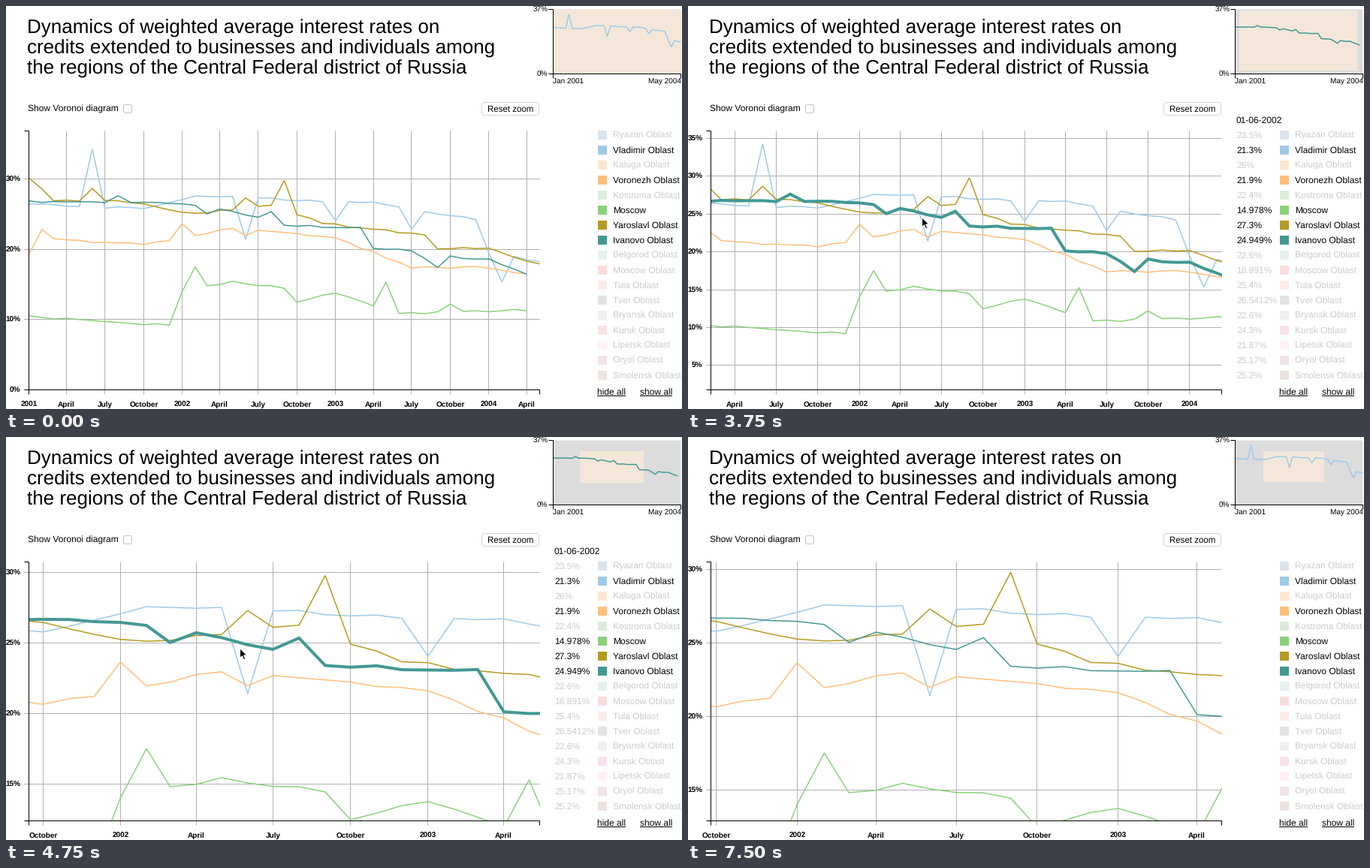
Animation, 900 px wide and 537 px high, one loop 7.75 s. Source, as a matplotlib script:

```python
import numpy as np
import matplotlib.pyplot as plt
from matplotlib.animation import FuncAnimation
from matplotlib.patches import Circle, FancyBboxPatch, Polygon, Rectangle

plt.rcParams.update({
    "font.family": "Liberation Sans",
    "text.hinting": "none",
    "path.snap": False,
    "toolbar": "None",
})

W, H, DPI = 900, 537, 72            # 72 dpi: one point is one pixel
STEP_MS, FRAMES = 250, 31

LEFT, RIGHT, TOP, BOTTOM = 30.5, 710.5, 166.5, 511.5
MINI_L, MINI_R, MINI_T, MINI_B = 728.5, 898.5, 4.5, 90.5
V_MAX = 36.84
FOCUS = (316.4, 280.1)              # fixed point of the zoom
GRID, FADED = "#b0b0b0", "#cccccc"
HOVER_MONTH = 17

LEGEND = [
    ("Ryazan Oblast", "#4c78a8", "23.5%"),
    ("Vladimir Oblast", "#9ecae9", "21.3%"),
    ("Kaluga Oblast", "#f58518", "26%"),
    ("Voronezh Oblast", "#ffbf79", "21.9%"),
    ("Kostroma Oblast", "#54a24b", "22.4%"),
    ("Moscow", "#88d27a", "14.978%"),
    ("Yaroslavl Oblast", "#b79a20", "27.3%"),
    ("Ivanovo Oblast", "#439894", "24.949%"),
    ("Belgorod Oblast", "#83bcb6", "22.6%"),
    ("Moscow Oblast", "#e45756", "18.891%"),
    ("Tula Oblast", "#ff9d98", "25.4%"),
    ("Tver Oblast", "#79706e", "26.5412%"),
    ("Bryansk Oblast", "#bab0ac", "22.6%"),
    ("Kursk Oblast", "#e07080", "24.3%"),
    ("Lipetsk Oblast", "#fcbfd2", "21.87%"),
    ("Oryol Oblast", "#b2798a", "25.17%"),
    ("Smolensk Oblast", "#9e765f", "25.2%"),
]
COLORS = {name: color for name, color, _ in LEGEND}

rng = np.random.default_rng(7)


def series(trend, spikes):
    """Monthly rates: a trend through key points, one-month spikes, slight jitter."""
    keys, rates = zip(*trend)
    values = np.interp(np.arange(keys[-1] + 1), keys, rates)
    for month, height in spikes.items():
        values[month] += height
    return values + rng.uniform(-0.15, 0.15, len(values))


SERIES = {
    "Vladimir Oblast": series(
        [(0, 26.4), (9, 25.8), (13, 27.6), (27, 26.6), (35, 24.3), (36, 19.5), (40, 18.3)],
        {5: 8.1, 17: -6, 24: -2.6, 30: -2.9, 37: -3.7}),
    "Voronezh Oblast": series(
        [(0, 21.6), (9, 20.7), (16, 23), (24, 21.7), (30, 17.4), (35, 17.4), (39, 16.6)],
        {0: -2.4, 1: 1.3, 12: 2, 17: -1}),
    "Moscow": series(
        [(0, 10.4), (11, 9.2), (12, 14), (16, 15.5), (20, 14.4), (21, 12.5), (24, 13.8),
         (29, 10.8), (39, 11.4)],
        {13: 3.2, 28: 3.9, 33: 1.3}),
    "Yaroslavl Oblast": series(
        [(0, 30.1), (2, 26.9), (7, 27), (13, 25), (19, 26.2), (23, 23.7), (31, 22),
         (32, 20), (36, 20.2), (40, 17.8)],
        {5: 1.8, 17: 1.5, 20: 4.2}),
    "Ivanovo Oblast": series(
        [(0, 26.8), (12, 26.6), (17, 25), (20, 23.3), (26, 23.2), (27, 20.2), (30, 19.9),
         (32, 17.5), (33, 19), (36, 18.5), (39, 16.4)],
        {7: 0.8, 14: -1, 19: 1.4}),
}

months = np.arange("2001-01", "2004-06", dtype="datetime64[M]")
days = months.astype("datetime64[D]").astype(float)
month_pos = (days - days[0]) / (days[-1] - days[0])

fig = plt.figure(figsize=(W / DPI, H / DPI), dpi=DPI, facecolor="white")
ax = fig.add_axes([0, 0, 1, 1])
ax.set(xlim=(0, W), ylim=(H, 0))
ax.axis("off")

clip = Rectangle((LEFT, TOP), RIGHT - LEFT, BOTTOM - TOP, transform=ax.transData)


def text(x, y, s, size=12, **kw):
    return ax.text(x, y, s, fontsize=size, va="baseline", zorder=6, **kw)


def line(xs, ys, color="black", width=1, z=4):
    return ax.plot(xs, ys, color=color, lw=width, zorder=z, solid_joinstyle="miter",
                   solid_capstyle="butt")[0]


def box(x, y, w, h, color, z=1, **kw):
    return ax.add_patch(Rectangle((x, y), w, h, fc=color, ec="none", lw=0, zorder=z, **kw))


def rounded(x, y, w, h, radius, color):
    style = f"round,pad=0,rounding_size={radius}"
    ax.add_patch(FancyBboxPatch((x, y), w, h, boxstyle=style, fc="white", ec=color, lw=1))


def crisp(v):
    return np.floor(v) + 0.5


def plot_x(pos, k):
    x = LEFT + (RIGHT - LEFT) * pos
    return FOCUS[0] + (x - FOCUS[0]) * k


def plot_y(value, k):
    y = BOTTOM - (BOTTOM - TOP) * value / V_MAX
    return FOCUS[1] + (y - FOCUS[1]) * k


def draw_axes(left, right, top, bottom, tick=6):
    line([left - tick, left, left, left - tick], [top, top, bottom, bottom])
    line([left, left, right, right], [bottom + tick, bottom, bottom, bottom + tick])


def draw_static():
    title = ("Dynamics of weighted average interest rates on",
             "credits extended to businesses and individuals among",
             "the regions of the Central Federal district of Russia")
    for i, row in enumerate(title):
        text(28, 37 + 27 * i, row, 26)

    text(29, 141, "Show Voronoi diagram")
    rounded(156.5, 131.5, 11, 11, 2.5, "#c4c4c4")
    rounded(633.5, 128.5, 76, 17, 4, "#d6d6d6")
    text(671.5, 141, "Reset zoom", 11.5, ha="center")

    draw_axes(LEFT, RIGHT, TOP, BOTTOM)
    draw_axes(MINI_L, MINI_R, MINI_T, MINI_B)
    text(721.5, 8, "37%", 10, ha="right")
    text(721.5, 94, "0%", 10, ha="right")
    text(728, 104, "Jan 2001", 10)
    text(899, 104, "May 2004", 10, ha="right")

    for i, (name, color, _) in enumerate(LEGEND):
        active = name in SERIES
        box(788, 166 + 20 * i, 12, 12, color, alpha=1 if active else 0.2)
        text(808, 176 + 20 * i, name, color="black" if active else FADED)
    for x0, x1, label in ((787, 825, "hide all"), (844, 887, "show all")):
        text(x0, 518, label)
        line([x0, x1], [519.5, 519.5])


def draw_grid(k):
    arts = []
    for value in range(0, 40, 10 if k == 1 else 5):
        y = crisp(plot_y(value, k))
        if TOP <= y <= BOTTOM:
            arts.append(line([24, RIGHT], [y, y], GRID, z=2))
            arts.append(text(19.5, y + 3.5, f"{value}%", 10, weight="bold", ha="right"))
    names = {3: "April", 6: "July", 9: "October"}
    for i in range(0, len(months), 3):
        x = crisp(plot_x(month_pos[i], k))
        if LEFT <= x <= RIGHT:
            arts.append(line([x, x], [TOP, BOTTOM + 6], GRID, z=2))
            label = names.get(i % 12, str(2001 + i // 12))
            arts.append(text(x, 534, label, 10, weight="bold", ha="center"))
    return arts


def draw_series(k, hovered):
    arts = []
    for name, values in SERIES.items():
        xs = plot_x(month_pos[:len(values)], k)
        art = line(xs, plot_y(values, k), COLORS[name], 4 if name == hovered else 1.5, z=3)
        art.set_clip_path(clip)
        arts.append(art)
    return arts


def draw_overview(k, hovered):
    name = hovered or "Vladimir Oblast"
    values = SERIES[name]
    w, h = MINI_R - MINI_L, MINI_B - MINI_T
    fx = (FOCUS[0] - LEFT) / (RIGHT - LEFT)
    fy = (FOCUS[1] - TOP) / (BOTTOM - TOP)
    return [
        box(MINI_L, MINI_T, w, h, "#dcdcdc", z=1),
        box(MINI_L + w * fx * (1 - 1 / k), MINI_T + h * fy * (1 - 1 / k), w / k, h / k,
            "#f4e7d9", z=2),
        line(MINI_L + w * month_pos[:len(values)], MINI_B - h * values / V_MAX,
             COLORS[name], 1.5, z=3),
    ]


def draw_readout():
    arts = [text(730, 156, "01-06-2002")]
    for i, (name, _, value) in enumerate(LEGEND):
        arts.append(text(730, 176 + 20 * i, value,
                         color="black" if name in SERIES else FADED))
    return arts


def draw_cursor(x, y):
    shape = np.array([(0, 0), (0, 13), (3, 10.3), (5, 15.3), (7.3, 14.3),
                      (5.2, 9.5), (9.2, 9.3)])
    return [ax.add_patch(Polygon(shape + (x + 0.5, y + 0.5), fc="black", ec="white",
                                 lw=1.1, zorder=8))]


def zoom_at(step):
    """Scale: speeds up gently for four steps, then coasts to rest in two."""
    t = step - 15
    if t < 0:
        return 1
    push = min(t, 4)
    coast = np.clip((t - 4) / 2, 0, 1)
    return 1.077 + 0.204 * push + 0.0071 * push**2 + 0.087 * (1 - (1 - coast)**2)


def hovered_at(step):
    if step == 9:
        return "Yaroslavl Oblast"
    return "Ivanovo Oblast" if 10 <= step < 24 else None


# first step of each pointer position
POINTER = {0: None, 1: (360, 113), 2: (287, 210), 3: (307, 235), 4: (312, 243),
           5: (311, 261), 10: (311, 281), 23: (311, 267), 24: (357, 163),
           25: (539, 27), 26: None}

live = []


def update(step):
    while live:
        live.pop().remove()
    k, hovered = zoom_at(step), hovered_at(step)
    live.extend(draw_grid(k) + draw_series(k, hovered) + draw_overview(k, hovered))
    if hovered:
        live.extend(draw_readout())
        if k == 1:
            spot = (plot_x(month_pos[HOVER_MONTH], k),
                    plot_y(SERIES[hovered][HOVER_MONTH], k))
            live.append(ax.add_patch(Circle(spot, 3, fc="black", ec="none", zorder=7)))
    pointer = POINTER[max(s for s in POINTER if s <= step)]
    if pointer:
        live.extend(draw_cursor(*pointer))
    return live


draw_static()
anim = FuncAnimation(fig, update, frames=FRAMES, init_func=lambda: [],
                     interval=STEP_MS, repeat=True, repeat_delay=0, blit=False)
plt.show()
```
